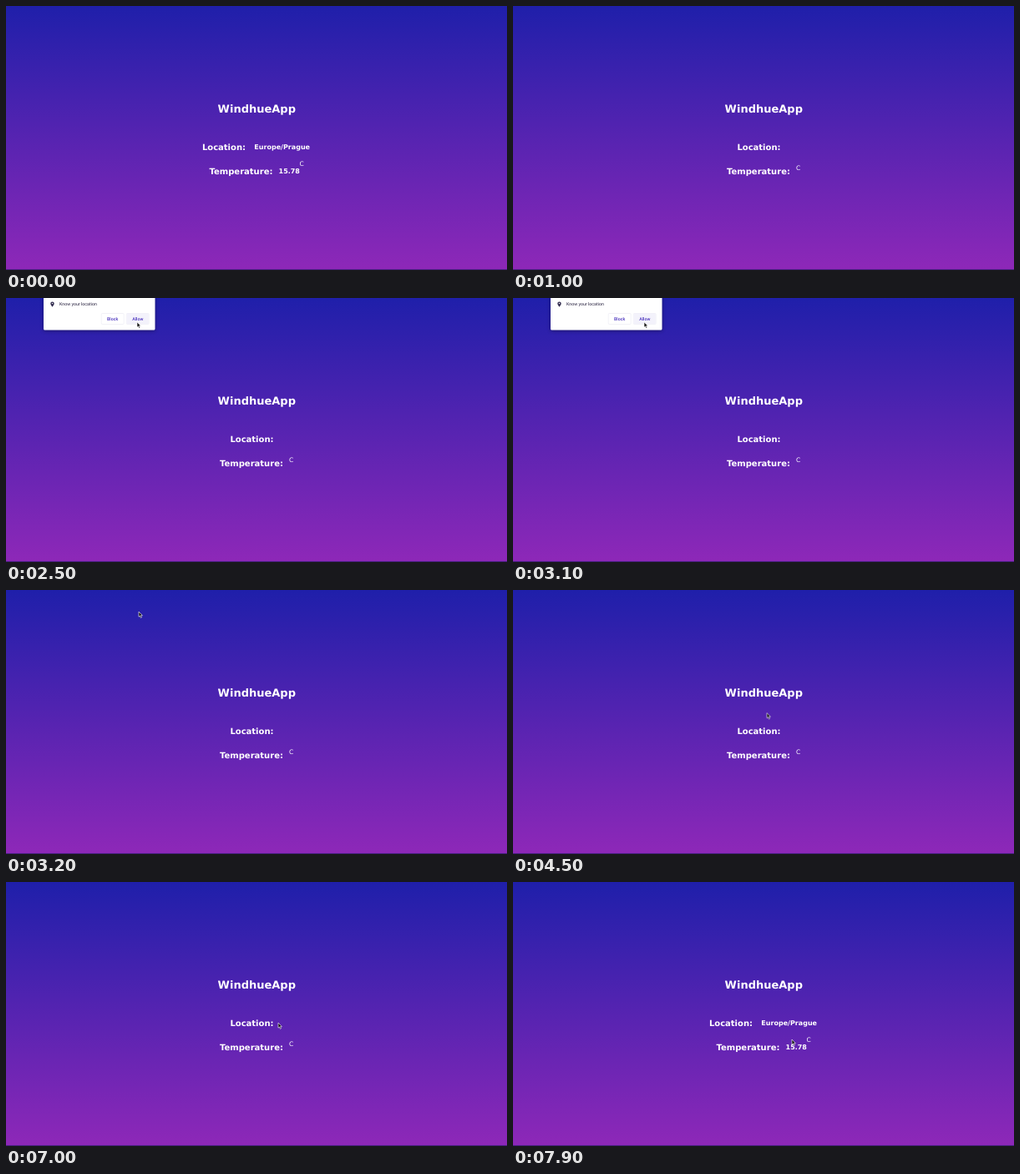
An HTML page that plays this animation: 600 by 317 pixels, repeating every 8 s.

```html
<!DOCTYPE html>
<html lang="en">
<head>
<meta charset="utf-8">
<title>WindhueApp</title>
<style>
  html, body { margin: 0; width: 100%; height: 100%; overflow: hidden; }
  svg { display: block; width: 100%; height: 100%; }

  text {
    font: bold 10px "DejaVu Sans", Verdana, sans-serif;
    fill: #fff;
    text-rendering: geometricPrecision;
  }
  .title { font-size: 13px; text-anchor: middle; }
  .value { font-size: 8px; }
  .unit { font-size: 7.5px; font-weight: normal; }
  .prompt text { font: 5.3px Roboto, Arial, sans-serif; fill: #27213f; }
  .prompt .action { font-weight: 500; fill: #4a32bd; text-anchor: middle; }
  .button { fill: #fff; stroke: #e4e2ee; stroke-width: .5; }

  .loaded, .empty, .prompt, .hover { animation: 8s step-end infinite; }
  .loaded { animation-name: loaded; }
  .empty { animation-name: empty; }
  .prompt { animation-name: prompt; filter: drop-shadow(0 1px 2px rgba(0, 0, 0, .4)); }
  .hover { animation-name: hover; fill: #f3f2fb; }
  .cursor { animation: move 8s linear infinite, appear 8s step-end infinite; }

  @keyframes loaded {
    0%, 92.5%, 100% { opacity: 1; }
    10% { opacity: 0; }
  }
  @keyframes empty {
    0%, 92.5%, 100% { opacity: 0; }
    10% { opacity: 1; }
  }
  @keyframes prompt {
    0%, 40%, 100% { opacity: 0; }
    13.75% { opacity: 1; }
  }
  @keyframes hover {
    0%, 40%, 100% { opacity: 0; }
    22.5% { opacity: 1; }
  }
  @keyframes appear {
    0%, 100% { opacity: 0; }
    17.5% { opacity: 1; }
  }
  @keyframes move {
    0%, 18.75% { transform: translate(178px, 15px); animation-timing-function: ease-out; }
    26.25%, 38.75% { transform: translate(157px, 29px); }
    40%, 45% { transform: translate(159px, 26px); animation-timing-function: ease-in-out; }
    53.75%, 56.25% { transform: translate(304px, 148px); }
    57.5% { transform: translate(310px, 104px); }
    58.75%, 60% { transform: translate(322px, 140px); animation-timing-function: ease-out; }
    63.75%, 87.5% { transform: translate(326px, 169px); animation-timing-function: ease-in-out; }
    96.25%, 100% { transform: translate(334px, 189px); }
  }
</style>
</head>
<body>
<svg viewBox="0 0 600 317" preserveAspectRatio="none">
  <defs>
    <linearGradient id="sky" x2="0" y2="1">
      <stop stop-color="#1f1faa"/>
      <stop offset="1" stop-color="#8e28b8"/>
    </linearGradient>
  </defs>
  <rect width="600" height="317" fill="url(#sky)"/>
  <rect y="316" width="600" height="1" fill="#47207f"/>

  <text class="title" x="300.3" y="127.7">WindhueApp</text>

  <g class="loaded">
    <text x="234.9" y="173">Location:</text>
    <text class="value" x="297.3" y="172">Europe/Prague</text>
    <text x="243.5" y="202">Temperature:</text>
    <text class="value" x="326.6" y="201">15.78</text>
    <text class="unit" x="351.5" y="192">C</text>
  </g>

  <g class="empty">
    <text x="268.4" y="173">Location:</text>
    <text x="256" y="202">Temperature:</text>
    <text class="unit" x="339" y="197.3">C</text>
  </g>

  <g class="prompt">
    <path d="M45 -4H178.5V37a1.5 1.5 0 0 1 -1.5 1.5H46.5A1.5 1.5 0 0 1 45 37Z" fill="#fff"/>
    <path d="M55.5 10.8C54.3 9 53.3 7.9 53.3 6.6a2.2 2.2 0 0 1 4.4 0C57.7 7.9 56.7 9 55.5 10.8Z" fill="#302a4d"/>
    <circle cx="55.5" cy="6.6" r=".75" fill="#fff"/>
    <text x="64" y="9.2">Know your location</text>
    <rect class="button" x="114.2" y="18.5" width="27" height="13" rx="1.2"/>
    <rect class="button" x="144.2" y="18.5" width="27" height="13" rx="1.2"/>
    <rect class="hover" x="144.5" y="18.8" width="26.4" height="12.4" rx="1"/>
    <text class="action" x="127.6" y="27">Block</text>
    <text class="action" x="157.8" y="27">Allow</text>
  </g>

  <path class="cursor" d="M0 0V6.2L1.4 5L2.4 7.3L3.5 6.8L2.5 4.6H4.4Z" fill="#111" stroke="#fff" stroke-width=".6" stroke-linejoin="round"/>
</svg>
</body>
</html>
```
